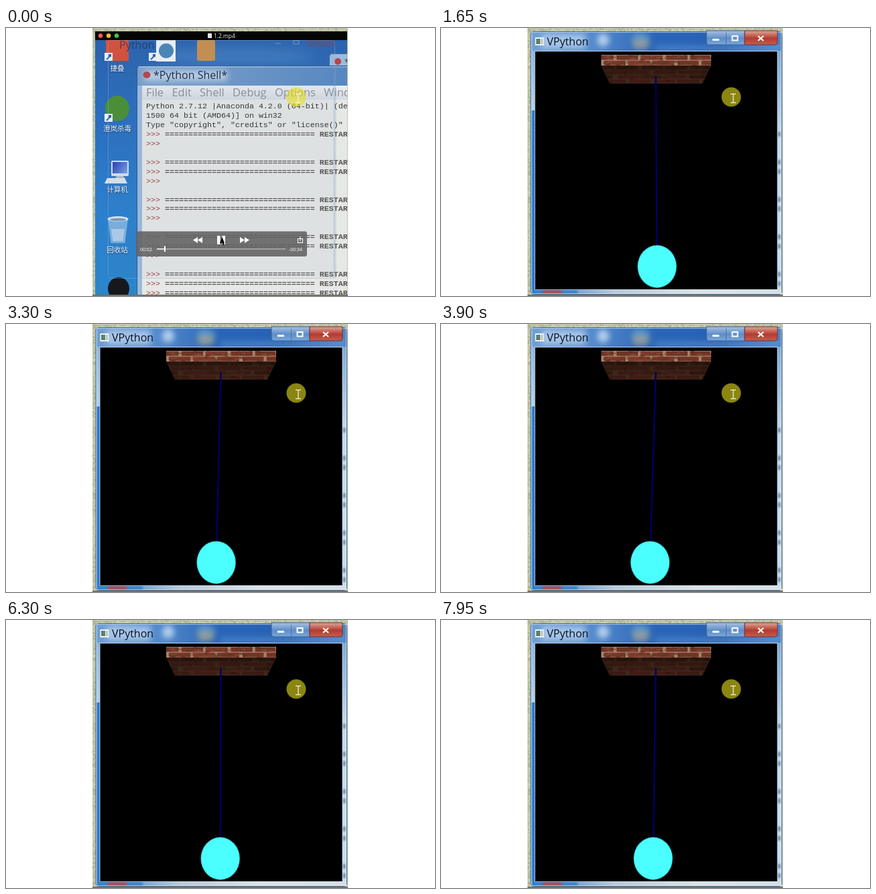
An HTML page with a canvas that plays this animation: 640x400 px, repeating every 8 s.

```html
<!DOCTYPE html>
<html lang="en">
<head>
<meta charset="utf-8">
<title>Pendulum</title>
<style>
html, body { margin: 0; width: 100%; height: 100%; overflow: hidden; background: #fff; }
canvas { display: block; width: 640px; height: 400px; }
</style>
</head>
<body>
<canvas id="stage" width="640" height="400"></canvas>
<script>
const W = 640, H = 400, LOOP = 8000, STEP = 150;
const UI = '"Open Sans", "Noto Sans", sans-serif';
const CJK = '"Noto Sans CJK SC", "Noto Sans CJK", sans-serif';
const MONO = '11.66px "Liberation Mono", monospace';
const ROW = 13.95;
const stage = document.getElementById('stage').getContext('2d');
let g;

function layer(draw) {
  const c = document.createElement('canvas');
  c.width = W;
  c.height = H;
  g = c.getContext('2d');
  draw();
  return c;
}

function seeded(s) {
  return () => (s = (s * 16807) % 2147483647) / 2147483647;
}

function rect(x, y, w, h, fill) {
  g.fillStyle = fill;
  g.fillRect(x, y, w, h);
}

function frame(x, y, w, h, color, width = 1) {
  g.strokeStyle = color;
  g.lineWidth = width;
  g.strokeRect(x, y, w, h);
}

function round(x, y, w, h, r, fill, line) {
  g.beginPath();
  g.roundRect(x, y, w, h, r);
  g.fillStyle = fill;
  g.fill();
  if (line) {
    g.strokeStyle = line;
    g.lineWidth = 1;
    g.stroke();
  }
}

function oval(x, y, rx, ry, fill) {
  g.beginPath();
  g.ellipse(x, y, rx, ry, 0, 0, Math.PI * 2);
  g.fillStyle = fill;
  g.fill();
}

function line(x0, y0, x1, y1, color, width = 1) {
  g.strokeStyle = color;
  g.lineWidth = width;
  g.beginPath();
  g.moveTo(x0, y0);
  g.lineTo(x1, y1);
  g.stroke();
}

// Upright trapezoid: top and bottom edge share a centre
function taperPath(cx, y, top, h, bottom) {
  g.beginPath();
  g.moveTo(cx - top / 2, y);
  g.lineTo(cx + top / 2, y);
  g.lineTo(cx + bottom / 2, y + h);
  g.lineTo(cx - bottom / 2, y + h);
  g.closePath();
}

function taper(cx, y, top, h, bottom, fill) {
  taperPath(cx, y, top, h, bottom);
  g.fillStyle = fill;
  g.fill();
}

function clipped(cx, y, top, h, bottom, draw) {
  g.save();
  taperPath(cx, y, top, h, bottom);
  g.clip();
  draw();
  g.restore();
}

function blurred(amount, draw) {
  g.save();
  g.filter = `blur(${amount}px)`;
  draw();
  g.restore();
}

function text(str, x, y, font, color, align = 'left') {
  g.font = font;
  g.fillStyle = color;
  g.textAlign = align;
  g.fillText(str, x, y);
}

function grad(x0, y0, x1, y1, ...colors) {
  const f = g.createLinearGradient(x0, y0, x1, y1);
  colors.forEach((c, i) => f.addColorStop(i / (colors.length - 1), c));
  return f;
}

function meadow() {
  rect(0, 0, W, H, '#fff');
  rect(129, 0, 381, H, '#c3c7aa');
  const rnd = seeded(77), tones = ['#b1b894', '#d2d5bd', '#a7ac8c'];
  for (let i = 0; i < 500; i++) {
    const left = i % 2;
    rect(129 + rnd() * (left ? 4 : 379), rnd() * (left ? H : 5), 2, 2, tones[i % 3]);
  }
  rect(129, 398, 381, 2, '#6f745c');
}

function pointer() {
  oval(433, 103, 14.5, 14.5, 'rgba(230,224,28,.6)');
  line(436, 99, 436, 111, '#f4f4e4', 1.2);
  for (const y of [98.5, 111.5]) line(432, y, 440, y, '#f4f4e4', 1.2);
}

function shortcut(x, y) {
  rect(x - 6, y - 6, 12, 12, '#eef4fa');
  line(x - 3, y + 4, x + 3, y - 2, '#2864b0', 2);
  rect(x, y - 4, 4, 4, '#2864b0');
}

function label(str, y) {
  g.save();
  g.shadowColor = '#0a2a55';
  g.shadowBlur = 2;
  g.shadowOffsetY = 1;
  text(str, 166, y, '10.5px ' + CJK, '#fff', 'center');
  g.restore();
}

function icons() {
  rect(149, 18, 34, 31, '#d8503c');
  rect(224, 18, 29, 32, '#f1f4f7');
  oval(239, 34, 11, 11, '#4a86b8');
  round(285, 18, 27, 31, 3, '#c98f4c');
  oval(166, 120, 18, 19, '#4a8f34');

  round(157, 198, 26, 23, 2, '#d7e3ee');
  rect(159, 200, 22, 17, grad(158, 200, 181, 218, '#2438a0', '#7fa8ee'));
  taper(170, 221, 10, 6, 18, '#aebccb');
  taper(164, 224, 26, 8, 34, '#dfe4ea');

  taper(167, 285, 30, 36, 21, 'rgba(205,224,240,.5)');
  taper(167, 300, 20, 18, 15, 'rgba(240,245,250,.45)');
  oval(167, 285, 15.5, 4, '#dfeaf3');
  oval(167, 286, 12, 2.3, '#829db9');

  oval(168, 389, 16, 17, '#16181c');

  shortcut(153, 43);
  shortcut(219, 43);
  shortcut(153, 134);
  label('捷叠', 64);
  label('澄岚杀毒', 154);
  label('计算机', 245);
  label('回收站', 335);
}

function shell() {
  round(195.5, 56.5, 320, 350, 5, grad(195, 56, 509, 90, '#7aa0cd', '#6d97c9', '#5687c2'), '#2f5688');
  rect(196, 86, 7, 312, 'rgba(200,220,240,.45)');
  line(197, 58, 509, 58, 'rgba(230,242,255,.6)');
  blurred(5, () => rect(206, 63, 124, 16, 'rgba(230,238,248,.65)'));
  rect(203, 86, 306, 312, '#e6e8e6');
  rect(203, 86, 306, 21, grad(0, 86, 0, 107, '#eceef1', '#d6dbe3'));

  oval(210, 70, 5.5, 5, '#b8434b');
  text('*Python Shell*', 220, 76, '16px ' + UI, '#1d2b40');
  let x = 209;
  for (const s of ['File', 'Edit', 'Shell', 'Debug', 'Options', 'Windows']) {
    text(s, x, 102, '16.5px ' + UI, '#8b9097');
    x += g.measureText(s).width + 12.3;
  }

  const head = [
    'Python 2.7.12 |Anaconda 4.2.0 (64-bit)| (default',
    '1500 64 bit (AMD64)] on win32',
    'Type "copyright", "credits" or "license()"'
  ];
  for (let i = 0; i <= 20; i++) {
    const y = 120 + i * ROW;
    if (i < 3) text(head[i], 209, y, MONO, '#333');
    else if (i % 4 !== 1) {
      text('>>>', 209, y, MONO, '#a03c3c');
      if (i % 4 || i === 20) text('='.repeat(32) + ' RESTART', 237, y, 'bold ' + MONO, '#575252');
    }
  }
}

function player() {
  rect(133, 5, 376, 13, '#050505');
  ['#f45b53', '#f5bb3c', '#4bc04b'].forEach((c, i) => oval(141 + i * 12, 11.5, 3.3, 3.3, c));
  rect(301, 8, 6, 7, '#e4e4e4');
  text('1.2.mp4', 310, 14.5, '8.4px ' + UI, '#e8e8e8');

  round(194, 303.5, 255, 37.5, 3, 'rgba(98,98,98,.88)');
  for (const side of [-1, 1]) {
    for (let i = 0; i < 2; i++) {
      g.save();
      g.translate(321 + side * (28 + i * 7), 316.5);
      g.rotate(side * Math.PI / 2);
      taper(0, -7, 0, 7, 9, '#fff');
      g.restore();
    }
    rect(318.75 + side * 3.75, 310, 4.5, 13, '#fff');
  }
  taper(322.5, 312, 0, 9, 7, '#111');
  line(322.5, 318, 325, 324, '#111', 2);
  frame(435.5, 314.5, 7, 6, '#fff');
  line(439, 311, 439, 318, '#fff');
  text('00:02', 200, 332.7, '7px ' + UI, '#fff');
  text('-00:34', 422, 332.7, '7px ' + UI, '#fff');
  rect(225, 329, 192, 1.6, '#a8a8a8');
  rect(225, 329, 12, 1.6, '#eee');
  rect(236, 325.5, 2, 8.5, '#fff');
}

function desktop() {
  meadow();
  clipped(321, 5, 376, 393, 376, () => {
    rect(133, 5, 376, 393, grad(133, 17, 150, 398, '#2a62ad', '#2a6fc0', '#2c7fcd', '#2a86cc'));
    blurred(9, () => oval(340, 42, 120, 12, 'rgba(90,145,205,.5)'));
    icons();
    text('Python', 169, 31, '16px ' + UI, 'rgba(22,42,82,.65)');
    round(482.5, 38.5, 40, 60, 4, '#9dbbdd', '#486d9b');
    oval(495, 50, 5, 5, '#b8434b');
    text('*', 505, 56, '15px ' + UI, '#1d2b40');
    shell();
    // Faint outline of the window about to open
    round(152.5, 18.5, 338, 355, 4, 'rgba(90,120,150,.06)', 'rgba(150,175,200,.4)');
    rect(488, 60, 5, 314, 'rgba(120,150,180,.16)');
    line(402, 23, 410, 23, 'rgba(180,205,230,.5)');
    frame(429, 19, 8, 5, 'rgba(180,205,230,.5)');
    rect(449, 17, 42, 11, 'rgba(130,70,85,.3)');
    pointer();
    player();
  });
}

// Staggered bricks with rough edges, mortar showing between the rows
function wall(y, h, rows, mortar, hue, light, rnd) {
  rect(239, y, 164, h, mortar);
  const rh = h / rows;
  for (let r = 0; r < rows; r++) {
    for (let x = 225 + (r % 2) * 18; x < 403; x += 36) {
      rect(x + rnd() * 3, y + r * rh + .8, 33 - rnd() * 3, rh - 1.3, `hsl(${hue} 50% ${light + rnd() * 5}%)`);
    }
  }
  for (let i = 0; i < 110; i++) {
    const l = light * (.6 + rnd() * .9);
    oval(239 + rnd() * 164, y + rnd() * h, 1 + rnd() * 3, .6 + rnd(), `hsl(${hue + 4} 36% ${l}% / .55)`);
  }
}

function bricks() {
  const rnd = seeded(2024);
  clipped(321, 40, 164, 16, 164, () => wall(40, 16, 2, '#a58468', 11, 29, rnd));
  clipped(321, 56, 164, 27, 138, () => {
    wall(56, 27, 4, '#3f2e20', 12, 13, rnd);
    rect(239, 56, 164, 27, grad(0, 56, 0, 83, 'rgba(0,0,0,.3)', 'rgba(70,25,12,.15)'));
  });
}

function buttons() {
  round(396, 4, 57, 21, [0, 0, 0, 4], grad(0, 6, 0, 25, '#9bb9dd', '#5f8ec8', '#7aa8da'), '#3e6193');
  round(453, 4, 49, 21, [0, 0, 4, 0], grad(0, 6, 0, 25, '#d79488', '#b53a30', '#c95d4a'), '#69343c');
  line(425.5, 7, 425.5, 25, '#4d73a3');
  rect(405, 16, 10, 3, '#fff');
  frame(434.5, 12, 8, 6.5, '#fff', 2);
  line(473, 12, 481, 19, '#fff', 2.2);
  line(481, 12, 473, 19, '#fff', 2.2);
}

function glass() {
  rect(135, 6, 373, 29, grad(135, 0, 508, 0, '#6f9fd6', '#5389cc', '#2a65b7', '#2761b3', '#4f86c6'));
  blurred(4, () => {
    rect(150, 9, 66, 22, 'rgba(190,213,240,.75)');
    oval(242, 18, 9, 10, 'rgba(205,224,244,.8)');
    oval(298, 22, 13, 10, 'rgba(190,180,140,.65)');
    rect(286, 10, 24, 6, 'rgba(90,165,225,.8)');
    rect(320, 26, 185, 9, 'rgba(110,165,222,.45)');
  });
  rect(135, 34, 6, 89, grad(0, 34, 0, 123, '#8ab5e2', '#b3d0ee'));
  rect(135, 123, 6, 274, '#2676ce');
  rect(502, 34, 6, 363, grad(0, 34, 0, 397, '#7cabd9', '#c4daee', '#cddfef', '#c6dbee'));
  blurred(1, () => {
    for (let i = 3; i <= 20; i++) {
      if (i % 4 > 1) rect(502, 113 + i * ROW, 5, 7, 'rgba(98,122,148,.7)');
    }
  });
  rect(135, 390, 373, 7, grad(135, 0, 508, 0, '#2e7bca', '#b7cadb', '#dce3e6', '#d5dfe8'));
  blurred(1.5, () => {
    rect(140, 391, 64, 6, '#3a83ca');
    rect(152, 391, 28, 6, '#ad4e50');
  });
}

function sceneWindow() {
  meadow();
  round(134, 5.5, 374.5, 392, 4, '#a9c8e8', '#41638c');
  clipped(321.25, 6, 373.5, 391, 373.5, glass);
  frame(135.5, 6.5, 372, 390, 'rgba(228,242,255,.6)');

  rect(140.5, 14, 13, 12, '#f2f5f4');
  rect(142, 16, 6, 8, '#5a806c');
  rect(149, 16, 3, 8, '#b7c6bd');
  text('VPython', 158, 26, '16px ' + UI, '#0c1420');
  buttons();
  rect(139.5, 34, 363, 356.5, '#c4d9ec');
  rect(140.5, 35, 361, 355, '#000');
  bricks();
  pointer();
}

// Damped swing, released at 0.45 s, speeding up a little as it dies down
function swing(t) {
  t = Math.max(t, .45);
  const u = t - 6.3;
  const phase = (2 + 239 * u + 1.2 * u * u) * Math.PI / 180;
  return -54 * Math.exp(-.31 * (t - .6)) * Math.sin(phase);
}

function pendulum(t) {
  const dx = swing(t), x = 320 + dx, y = 72 + Math.sqrt(284 ** 2 - dx ** 2);
  line(320.5, 72, x, y, '#00006c', 2.2);
  oval(x, y, 29.3, 32, '#27a5a8');
  oval(x, y, 28.5, 31.2, '#4cffff');
}

const before = layer(desktop);
const after = layer(sceneWindow);
const start = performance.now();

function tick() {
  const step = Math.floor((performance.now() - start) % LOOP / STEP);
  g = stage;
  g.drawImage(step ? after : before, 0, 0);
  if (step) pendulum(step * STEP / 1000);
  requestAnimationFrame(tick);
}

tick();
</script>
</body>
</html>
```
